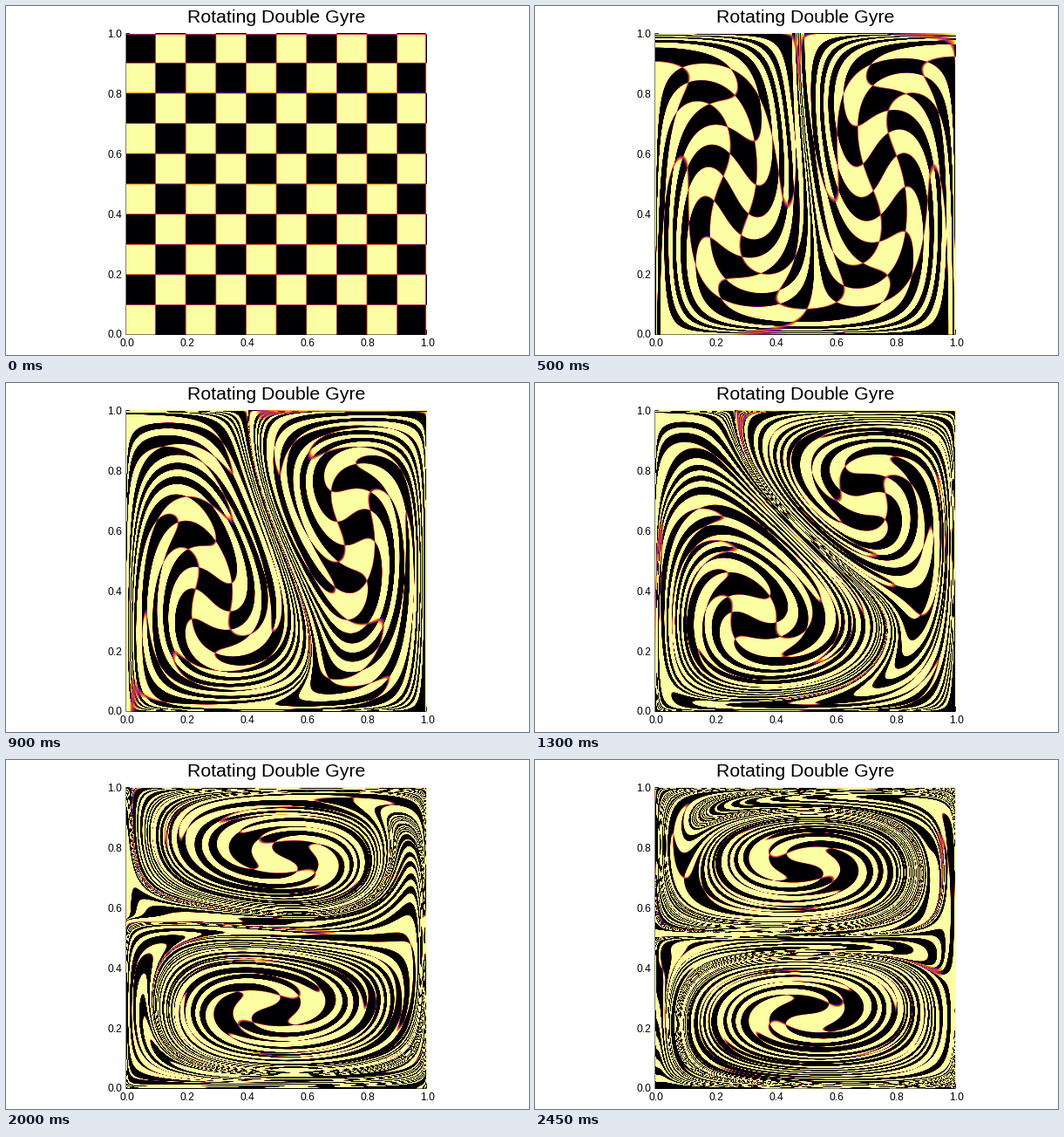
Animation of 600 by 400 pixels, one loop 2.5 s. Source, as a matplotlib script:

```python
import numpy as np
import matplotlib.pyplot as plt
from matplotlib.animation import FuncAnimation
from matplotlib.patches import Rectangle

W, H, DPI = 600, 400, 100
FRAMES, INTERVAL = 50, 50
DT = 1 / (FRAMES - 1)      # flow time per frame
SUBSTEPS = 2               # Runge-Kutta steps per frame
BLOCK = 7                  # frames covered by one lookup table
TABLE_N = 601

# Plot box in stage pixels
LEFT, RIGHT, TOP, BOTTOM = 138, 483, 31, 377
X0, Y0, SIZE = 137.7, 376.3, 344.8


def velocity(x, y, t):
    """Double gyre whose stream function turns by 90 degrees for t in 0..1."""
    s = t * t * (3 - 2 * t)
    sx, cx = np.sin(np.pi * x), np.cos(np.pi * x)
    sy, cy = np.sin(np.pi * y), np.cos(np.pi * y)
    cross = cx * cy
    u = -2 * np.pi * sx * ((1 - s) * cross + s * (2 * cy * cy - 1))
    v = 2 * np.pi * sy * ((1 - s) * (2 * cx * cx - 1) + s * cross)
    return u, v


def flow_back(x, y, start, count):
    """Carry points back in time by count frames from frame start."""
    h = -DT / SUBSTEPS
    for n in range(count * SUBSTEPS):
        t = start * DT + n * h
        u1, v1 = velocity(x, y, t)
        u2, v2 = velocity(x + h / 2 * u1, y + h / 2 * v1, t + h / 2)
        u3, v3 = velocity(x + h / 2 * u2, y + h / 2 * v2, t + h / 2)
        u4, v4 = velocity(x + h * u3, y + h * v3, t + h)
        x = x + h / 6 * (u1 + 2 * (u2 + u3) + u4)
        y = y + h / 6 * (v1 + 2 * (v2 + v3) + v4)
    return np.clip(x, 0, 1), np.clip(y, 0, 1)


def make_table(end):
    """Backward flow map over one block, stored as x + iy."""
    axis = np.linspace(0, 1, TABLE_N, dtype=np.float32)
    x, y = flow_back(*np.meshgrid(axis, axis), end, BLOCK)
    return (x + 1j * y).astype(np.complex64).ravel()


def lookup(table, x, y):
    gx, gy = x * (TABLE_N - 1), y * (TABLE_N - 1)
    i = np.minimum(np.floor(gx), TABLE_N - 2)
    j = np.minimum(np.floor(gy), TABLE_N - 2)
    fx, fy = gx - i, gy - j
    k = (j * TABLE_N + i).astype(np.int64)
    low = table[k] * (1 - fx) + table[k + 1] * fx
    k += TABLE_N
    high = table[k] * (1 - fx) + table[k + 1] * fx
    z = low * (1 - fy) + high * fy
    return np.clip(z.real, 0, 1), np.clip(z.imag, 0, 1)


# Checkerboard signs on mesh nodes, linear in between
nodes = np.linspace(0, 1, 200)
signs = 1 - 2 * (np.floor(nodes * 10 % 10) % 2)


def checker(x, y):
    value = np.interp(x, nodes, signs) * np.interp(y, nodes, signs)
    return value.astype(np.float32)


cols = np.clip((np.arange(LEFT, RIGHT) + 0.5 - X0) / SIZE, 0, 1)
rows = np.clip((Y0 - np.arange(TOP, BOTTOM) - 0.5) / SIZE, 0, 1)
px, py = np.meshgrid(cols.astype(np.float32), rows.astype(np.float32))
tables = [make_table(end) for end in range(BLOCK, FRAMES, BLOCK)]


def pattern(k):
    blocks, rest = divmod(k, BLOCK)
    x, y = flow_back(px, py, k, rest)
    for table in reversed(tables[:blocks]):
        x, y = lookup(table, x, y)
    return checker(x, y)


patterns = [pattern(k) for k in range(FRAMES)]

fig = plt.figure(figsize=(W / DPI, H / DPI), dpi=DPI, facecolor="white")
ax = fig.add_axes([0, 0, 1, 1])
image = ax.imshow(patterns[0], cmap="inferno", vmin=-1, vmax=1,
                  interpolation="nearest", aspect="auto",
                  extent=(LEFT, RIGHT, BOTTOM, TOP))
ax.set_xlim(0, W)
ax.set_ylim(H, 0)
ax.axis("off")


def bar(x, y, w, h, alpha):
    ax.add_patch(Rectangle((x, y), w, h, color="black", alpha=alpha, lw=0,
                           antialiased=False, zorder=3))


def label(x, y, text, size, align):
    ax.text(x, y, text, fontsize=size * 72 / DPI, family="Liberation Sans",
            ha=align, va="baseline", color="black")


# Axis lines and the end ticks that stay visible
bar(LEFT - 1, TOP, 1, BOTTOM - TOP, 0.5)
bar(LEFT, BOTTOM - 1, RIGHT - LEFT, 1, 0.5)
bar(RIGHT - 1, BOTTOM - 6, 1, 5, 0.9)
bar(LEFT, TOP, 4, 1, 0.9)

label(310.5, 19, "Rotating Double Gyre", 21.3, "center")
for n in range(6):
    text = f"{n / 5:.1f}"
    label(138.8 + n * 68.9, 390.5, text, 12, "center")
    label(133, 380.5 - n * 68.9, text, 12, "right")


def update(k):
    image.set_data(patterns[k])
    return (image,)


anim = FuncAnimation(fig, update, frames=FRAMES, interval=INTERVAL,
                     repeat=True, repeat_delay=0, blit=False)
plt.show()
```
